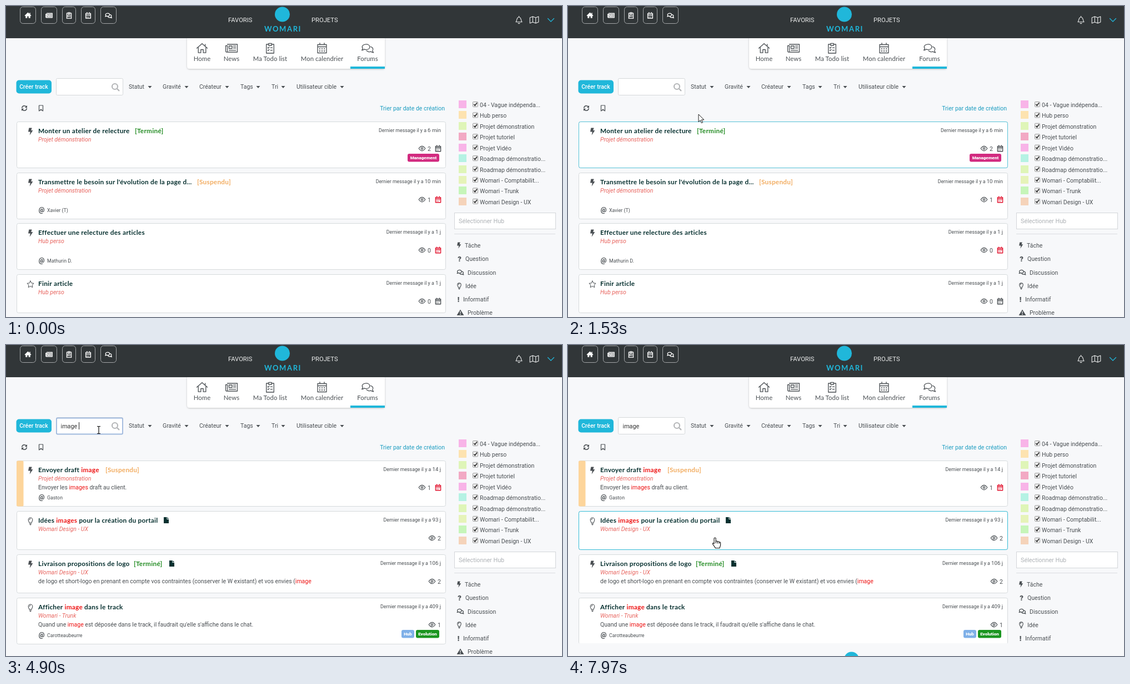
An HTML page that plays this animation: 1001x560 px, repeating every 8000 ms.

```html
<!DOCTYPE html>
<html lang="fr">
<head>
<meta charset="utf-8">
<title>Forums</title>
<style>
html, body { margin: 0; width: 100%; height: 100%; overflow: hidden; background: #f7f8fa; }
svg { display: block; }
text { font: 10.5px Roboto, sans-serif; fill: #4a4f53; white-space: pre; }
.title { font: 700 11.8px Lato, sans-serif; letter-spacing: .26px; fill: #06302f; }
.nav { font: 11.3px Lato, sans-serif; letter-spacing: .1px; text-anchor: middle; }
.hub { font-style: italic; fill: #e8655f; }
.small { font-size: 8.8px; }
.age { text-anchor: end; font-size: 8.8px; }
.age tspan { font-size: 9.65px; }
.menu { font-size: 11.2px; fill: #eceded; }
.brand { font: 700 13px Lato, sans-serif; letter-spacing: 1.6px; fill: #20b7da; text-anchor: middle; }
.tag { font: 900 8px Roboto, sans-serif; fill: #fff; text-anchor: middle; }
.button { font-weight: 500; fill: #fff; text-anchor: middle; }
.link { fill: #1b9cc0; text-anchor: end; }
.field { font-size: 10.8px; fill: #333; }
.hint { font-size: 10.8px; fill: #aeb2b6; }
.at { font: 900 12px Roboto, sans-serif; text-anchor: middle; }
.sign { font: 900 13px Roboto, sans-serif; text-anchor: middle; }
.hit { fill: #ee1414; }
.line { fill: none; stroke: currentColor; stroke-linejoin: round; stroke-linecap: round; vector-effect: non-scaling-stroke; }
</style>
</head>
<body>
<svg id="stage" width="1001" height="560" viewBox="0 0 1001 560"></svg>
<script>
const LOOP = 8000, CYAN = '#20b7da', INK = '#4a4f53', BG = '#f7f8fa';
const GREEN = '#228b22', ORANGE = '#f2ac60', RED = '#e2142f';

// Icons are centred on 0,0
const line = (d, w = 1.1) => `<path d="${d}" class="line" stroke-width="${w}"/>`;
const solid = d => `<path d="${d}" fill="currentColor" fill-rule="evenodd"/>`;
const icons = {
  bolt: solid('M-2.6-6.5H2.6L1.2-2H4.4L-1.4 6.8L-.2.6H-4Z'),
  star: line('M0-6L1.9-2.1 6.1-1.6 3 1.4 3.8 5.7 0 3.6-3.8 5.7-3 1.4-6.1-1.6-1.9-2.1Z', 1),
  bulb: line('M-2 3.2C-2 1.5-3.8.6-3.8-2.2A3.8 3.8 0 0 1 3.8-2.2C3.8.6 2 1.5 2 3.2ZM-1.6 5H1.6M-.8 6.6H.8M-1.8-2.4Q-1.6-4 0-4.2'),
  eye: line('M-5.8 0Q0-8.4 5.8 0Q0 8.4-5.8 0Z', 1.2) + line('M-1.7 0A1.7 1.7 0 1 1 1.7 0A1.7 1.7 0 1 1-1.7 0', 1.2),
  cal: line('M-4.6-3.8H4.6V5.2H-4.6ZM-4.6-1.2H4.6M-2.3-5.6V-4M2.3-5.6V-4', 1.4) + line('M-2.4 1H-2.3M0 1H.1M2.4 1H2.5M-2.4 3.2H-2.3M0 3.2H.1', 1.3),
  navCal: line('M-8-6.5H8V8.5H-8ZM-8-2.5H8M-4-9.3V-6.5M4-9.3V-6.5', 1.3) + line('M-4.4 1.2H-3.8M-.3 1.2H.3M3.8 1.2H4.4M-4.4 5H-3.8M-.3 5H.3M3.8 5H4.4', 1.8),
  home: line('M-9.5 0L0-8.2 9.5 0M-6.8-1.6V8.2H-2.2V2.5H2.2V8.2H6.8V-1.6M5.6-7V-4', 1.3),
  homeSolid: solid('M0-5.4L6 .2 5 1.2 4.2.5V4.8H1.2V1.5H-1.2V4.8H-4.2V.5L-5 1.2-6 .2ZM2.8-4.8H4.2V-1.5L2.8-2.8Z'),
  news: line('M-7.5-7H10.5V7H-9Q-10.5 7-10.5 5V-4.5H-7.5V5.5M-4.6-4H1V.5H-4.6ZM3.4-3.8H7.8M3.4-.5H7.8M-4.6 3.6H7.8', 1.3),
  clip: line('M-2.5-7H-6.8V9H6.8V-7H2.5M-2.7-8.6H2.7V-5H-2.7ZM.8-.8H4M.8 3.6H4M-4.4-1L-3.4 0-1.6-2.2M-4.4 3.4L-3.4 4.4-1.6 2.2', 1.3),
  chat: line('M-2.6-7.2C1-7.2 3.8-5.2 3.8-2.3S1 2.6-2.6 2.6C-4 2.6-5 2.4-6 1.9C-7.2 2.9-8.8 3.6-10.4 3.5C-9.2 2.4-8.8 1.2-8.6.3C-11.6-3.5-8-7.2-2.6-7.2ZM5.4-2.6C9-2 11.2 1.6 8.8 4.6C9 5.6 9.4 6.6 10.6 7.8C8.8 7.9 7.4 7.2 6.2 6.2C2.8 7.4-.6 6-1.8 4.4', 1.3),
  bell: line('M-5.5 3.8C-3.4 1.8-4.4-5 0-5S3.4 1.8 5.5 3.8ZM0-6.6V-5M-1.5 6Q0 7.2 1.5 6', 1.1),
  map: line('M-7.8-4L-2.7-6 2.7-4 7.8-6V4L2.7 6-2.7 4-7.8 6ZM-2.7-6V4M2.7-4V6', 1.1),
  chevron: line('M-5.5-2.5L0 3 5.5-2.5', 1.3),
  caret: solid('M-3.5-2H3.5L0 2Z'),
  search: line('M4-1A5 5 0 1 1-6-1A5 5 0 1 1 4-1M2.8 2.8L6.4 6.4', 2.2),
  refresh: line('M-4.2-.8A4.3 4.3 0 0 1 3.4-2.7M4.2.8A4.3 4.3 0 0 1-3.4 2.7', 1.5) + solid('M5-5V-.8H.8ZM-5 5V.8H-.8Z'),
  mark: line('M-3.5-5H3.5V5L0 2.3-3.5 5Z', 1.2),
  file: solid('M-4.5-5.5H1V-1.6H4.5V5.5H-4.5ZM1.9-5.5L4.5-2.5H1.9Z'),
  warn: solid('M0-5.6L6.4 5H-6.4ZM-.8-2.2L-.5 1.6H.5L.8-2.2ZM-.8 2.4V4H.8V2.4Z'),
};

const icon = (name, x, y, color = INK, k = 1) =>
  `<g transform="translate(${x} ${y}) scale(${k})" color="${color}">${icons[name]}</g>`;
// Words between stars are search hits
const text = (x, y, str, cls = '', fill = '') =>
  `<text x="${x}" y="${y}" class="${cls}"${fill && ` style="fill:${fill}"`}>${str.replace(/\*(.+?)\*/g, '<tspan class="hit">$1</tspan>')}</text>`;
const box = (x, y, w, h, fill, stroke = 'none', r = 0, extra = '') =>
  `<rect x="${x}" y="${y}" width="${w}" height="${h}" rx="${r}" fill="${fill}" stroke="${stroke}" ${extra}/>`;

function header() {
  let s = '<path d="M326 57H682V109Q682 113 678 113H331Q326 113 326 108Z" fill="#fff" filter="url(#soft)"/>';
  s += box(0, 0, 1001, 58, '#313638');
  [[25, 29, 'homeSolid', 1], [63, 29, 'news', .55], [101, 25, 'clip', .6], [135, 26, 'cal', .95], [170, 29, 'chat', .55]]
    .forEach(([x, w, name, k]) => {
      s += box(x + .5, 1.5, w - 1, 30, 'none', '#a3a6a8', 5) + icon(name, x + w / 2, 17, '#fff', k);
    });
  s += text(400, 29, 'FAVORIS', 'menu') + text(550, 29, 'PROJETS', 'menu');
  s += `<circle cx="497.5" cy="15" r="13.5" fill="${CYAN}"/>` + text(498.5, 46, 'WOMARI', 'brand');
  s += icon('bell', 923.5, 25, '#eceded') + icon('map', 951, 25, '#eceded') + icon('chevron', 981, 25, CYAN);
  s += box(620, 109, 62, 4, CYAN);
  [['home', 353, 'Home'], ['news', 406, 'News'], ['clip', 475.5, 'Ma Todo list'], ['navCal', 569, 'Mon calendrier'], ['chat', 651, 'Forums']]
    .forEach(([name, x, label]) => s += icon(name, x, 76) + text(x, 99, label, 'nav'));
  return s;
}

function toolbar() {
  let s = box(18.5, 133.5, 63.5, 24, CYAN, 'none', 5) + text(50, 149, 'Créer track', 'button');
  s += box(90.5, 130.5, 120, 30, '#fff', '#d5d8da', 2);
  s += box(91, 131.5, 119, 29, '#fff', '#9fb9de', 2, 'id="focus" stroke-width="1.8"');
  s += icon('search', 197, 146, '#b4b6b8') + '<text id="typed" class="field" x="98.5" y="149.5"></text>';
  s += '<path id="caret" d="M0 139V152" stroke="#222"/>';
  [['Statut', 221, 259], ['Gravité', 282, 325], ['Créateur', 348, 398], ['Tags', 422, 454], ['Tri', 478, 499], ['Utilisateur cible', 523, 605]]
    .forEach(([label, x, c]) => s += text(x, 149, label) + icon('caret', c, 146));
  return s + icon('refresh', 33, 184) + icon('mark', 63, 184) + text(790, 188, 'Trier par date de création', 'link');
}

function sidebar() {
  const hubs = [['#f8b4e8', '04 - Vague indépenda...'], ['#fde3b0', 'Hub perso'], ['#dff5b8', 'Projet démonstration'],
    ['#f2a9c4', 'Projet tutoriel'], ['#f8b4e8', 'Projet Vidéo'], ['#b5f2e4', 'Roadmap démonstratio...'],
    ['#dff5b8', 'Roadmap démonstratio...'], ['#e6f3b9', 'Womari - Comptabilit...'], ['#c6f5b9', 'Womari - Trunk'], ['#f5d3ba', 'Womari Design - UX']];
  let s = '';
  hubs.forEach(([color, label], i) => {
    const y = 182 + i * 19.42;
    s += box(815, Math.round(y - 12), 14, 14, color) + box(840.5, y - 9.5, 9, 9, '#f1f1f1', '#9a9a9a', 1);
    s += `<path d="M842.3 ${y - 5}l2 2.3 3.8-5.2" fill="none" stroke="#222" stroke-width="1.6"/>` + text(853, y, label);
  });
  s += box(807.5, 372.5, 182, 29, '#fff', '#d3d6d9') + text(815, 391, 'Sélectionner Hub', 'hint');
  s += box(807, 410, 182, 1, '#dadde0');
  s += icon('bolt', 815.5, 431, INK, .85) + text(826, 435, 'Tâche');
  s += text(816.5, 460, '?', 'sign') + text(827, 459, 'Question');
  s += icon('chat', 818, 479.5, INK, .56) + text(831, 483.5, 'Discussion');
  s += icon('bulb', 816, 504, INK, .85) + text(827, 508, 'Idée');
  s += text(814.5, 532.5, '!', 'sign') + text(823, 532, 'Informatif');
  return s + icon('warn', 818, 552) + text(831, 556, 'Problème');
}

// y: top edge, h: height, cal: calendar colour, tags: [x, width, colour, label]
function card(c) {
  const y = c.y, low = y + 48;
  let s = box(19.5, y, 772, c.h, '#fff', '#d6dadc', 3);
  if (c.bar) s += box(19, y, 12.5, c.h, c.bar, 'none', 2);
  s += box(19.5, y, 772, c.h, 'none', '#35bcd6', 3, `id="${c.id}" opacity="0"`);
  s += icon(c.icon, 44, y + 17.5) + text(58, y + 20, c.title, 'title') + text(58, y + 35.2, c.hub, 'hub');
  if (c.state) s += text(c.state[0], y + 20, `[${c.state[1]}]`, 'title', c.state[1] === 'Terminé' ? GREEN : ORANGE);
  if (c.file) s += icon('file', c.file, y + 16, '#06302f');
  if (c.body) s += text(58, y + 51.5, c.body);
  if (c.who) s += text(64, c.at + 4, '@', 'at') + text(74, c.at + 3.5, c.who, 'small');
  s += `<text x="783" y="${y + 18.7}" class="age">Dernier message il y a <tspan>${c.age}</tspan></text>`;
  const x = c.cal ? 749 : 767;
  s += icon('eye', x, low) + text(x + 10, low + 4, String(c.seen));
  if (c.cal) s += icon('cal', 778, low, c.cal);
  (c.tags || []).forEach(([tx, w, color, label]) => {
    const ty = y + 57.5;
    s += box(tx, ty, w, 14.5, color, 'none', 3) + text(tx + w / 2, ty + 10.2, label, 'tag');
  });
  return s;
}

const allCards = [
  { id: 'a1', y: 208.5, h: 83, icon: 'bolt', title: 'Monter un atelier de relecture', state: [232, 'Terminé'], hub: 'Projet démonstration',
    age: '6 min', seen: 2, cal: INK, tags: [[723, 57, '#d22b80', 'Management']] },
  { id: 'a2', y: 300.5, h: 83, icon: 'bolt', title: "Transmettre le besoin sur l'évolution de la page d...", state: [344, 'Suspendu'], hub: 'Projet démonstration',
    age: '10 min', seen: 1, cal: RED, who: 'Xavier (T)', at: 367 },
  { id: 'a3', y: 391.5, h: 83, icon: 'bolt', title: 'Effectuer une relecture des articles', hub: 'Hub perso',
    age: '1 j', seen: 0, cal: RED, who: 'Mathurin D.', at: 458 },
  { id: 'a4', y: 483.5, h: 69, icon: 'star', title: 'Finir article', hub: 'Hub perso', age: '1 j', seen: 0, cal: INK },
];
const found = [
  { id: 'b1', y: 208.5, h: 82, icon: 'bolt', bar: '#fdd59b', title: 'Envoyer draft *image*', state: [179, 'Suspendu'], hub: 'Projet démonstration',
    body: 'Envoyer les *images* draft au client.', age: '14 j', seen: 1, cal: RED, who: 'Gaston', at: 274 },
  { id: 'b2', y: 299.5, h: 69, icon: 'bulb', title: 'Idées *images* pour la création du portail', file: 288.5, hub: 'Womari Design - UX', age: '93 j', seen: 2 },
  { id: 'b3', y: 377.5, h: 69, icon: 'bolt', title: 'Livraison propositions de logo', state: [230, 'Terminé'], file: 298.5, hub: 'Womari Design - UX',
    body: 'de logo et short-logo en prenant en compte vos contraintes (conserver le W existant) et vos envies (*image*', age: '106 j', seen: 2 },
  { id: 'b4', y: 455.5, h: 83, icon: 'bulb', title: 'Afficher *image* dans le track', hub: 'Womari - Trunk',
    body: "Quand une *image* est déposée dans le track, il faudrait qu'elle s'affiche dans le chat.", age: '409 j', seen: 1,
    who: 'Carotteaubeurre', at: 522, tags: [[712, 23, '#7fb0e8', 'Hub'], [738, 42, '#1a951f', 'Evolution']] },
];

const pointers = `
  <circle id="click" r="9.5" fill="#ff0" opacity=".4"/>
  <g id="arrow"><path transform="scale(.86)" d="M0 0V16L3.7 12.4 6.2 18.2 8.7 17.2 6.3 11.5H11.5Z" fill="#fff" stroke="#111" stroke-width="1.1"/></g>
  <g id="hand"><path d="M-2 1.5C-2-.6 1.2-.6 1.2 1.5V7C1.6 5.6 4.2 5.8 4.2 7.4C5 6.2 7 6.6 7.2 8.2C8.2 7.4 9.6 8 9.6 9.6V13C9.6 15.5 8.2 16 8 18.8H.2C0 16.4-2.8 14.6-4.4 11.6C-5.2 9.8-3.4 9-2 11ZM1.2 7V10M4.2 7.5V10.5M7.2 8.5V10.8" fill="#fff" stroke="#111" stroke-width="1.1" stroke-linejoin="round"/></g>
  <g id="beam"><path d="M-3-6.5H-1Q0-6.5 0-5.5V5.5Q0 6.5-1 6.5H-3M3-6.5H1Q0-6.5 0-5.5M0 5.5Q0 6.5 1 6.5H3" fill="none" stroke="#111" stroke-width="1.2"/></g>`;

document.getElementById('stage').innerHTML =
  '<defs><filter id="soft" x="-5%" y="-10%" width="110%" height="130%"><feDropShadow dx="0" dy="1" stdDeviation="1.6" flood-opacity=".22"/></filter></defs>' +
  box(0, 0, 1001, 560, BG) + header() + toolbar() + sidebar() +
  `<g id="all">${allCards.map(card).join('')}</g><g id="found">${found.map(card).join('')}</g>` +
  `<g id="footer">${box(0, 537, 880, 23, BG)}<circle cx="510.5" cy="566" r="13.5" fill="${CYAN}"/></g>` + pointers;

const $ = id => document.getElementById(id);
const show = (id, on) => $(id).style.display = on ? '' : 'none';
const within = (t, a, b) => t >= a && t < b;

// time, x, y
const path = [[400, 879, 552], [560, 690, 430], [740, 462, 311], [900, 360, 278], [1190, 290, 258], [1290, 288, 256],
  [1410, 262, 228], [1530, 235, 195], [1750, 200, 171], [2080, 170, 157], [2230, 167, 153], [6200, 167, 153],
  [6360, 182, 161], [6560, 205, 210], [6760, 235, 270], [6900, 255, 315], [7000, 264, 341], [7200, 265, 347]];
const hover = { a4: [470, 505], a3: [510, 615], a2: [610, 800], a1: [830, 1490], b1: [6555, 6830], b2: [6855, LOOP] };
const keys = [3590, 3830, 4020, 4210, 4280, 4770];
const caretX = [99.5, 101.5, 111.5, 116.5, 123, 129.5, 131.5];
const blinks = [[2230, 2730], [3270, 5340], [5830, 6460], [6990, 7530]];

function pointerAt(t) {
  const i = path.findIndex(p => p[0] > t);
  if (i < 0) return path[path.length - 1].slice(1);
  const [a, b] = [path[Math.max(i - 1, 0)], path[i]];
  const k = (t - a[0]) / (b[0] - a[0] || 1);
  return [a[1] + (b[1] - a[1]) * k, a[2] + (b[2] - a[2]) * k];
}

const clamp = v => Math.max(0, Math.min(1, v));
const FADE = 200;

function draw(t) {
  const searched = t >= 4900;
  show('all', !searched);
  show('found', searched);
  show('footer', t >= 7970);
  show('focus', within(t, 2230, 7530));

  const n = keys.filter(k => t >= k).length;
  $('typed').textContent = 'image '.slice(0, n);
  $('caret').setAttribute('transform', `translate(${caretX[n]} 0)`);
  show('caret', blinks.some(([a, b]) => within(t, a, b)));

  for (const id in hover) {
    const [a, b] = hover[id];
    const peak = clamp((b - a) / FADE);
    $(id).setAttribute('opacity', t < b ? clamp((t - a) / FADE) : peak * clamp(1 - (t - b) / FADE));
  }

  const [x, y] = pointerAt(t);
  const overField = x > 90 && x < 211 && y > 131 && y < 161;
  const overCard = x < 792 && (searched ? found : allCards).some(c => y > c.y && y < c.y + c.h);
  const kind = overField ? 'beam' : overCard ? 'hand' : 'arrow';
  ['arrow', 'hand', 'beam', 'click'].forEach(id => {
    $(id).setAttribute('transform', `translate(${Math.round(x)} ${Math.round(y)})`);
    show(id, id === 'click' ? within(t, 2230, 2360) || within(t, 7530, 7670) : t >= 400 && id === kind);
  });
}

const start = performance.now();
(function tick() {
  draw((performance.now() - start) % LOOP);
  requestAnimationFrame(tick);
})();
</script>
</body>
</html>
```
